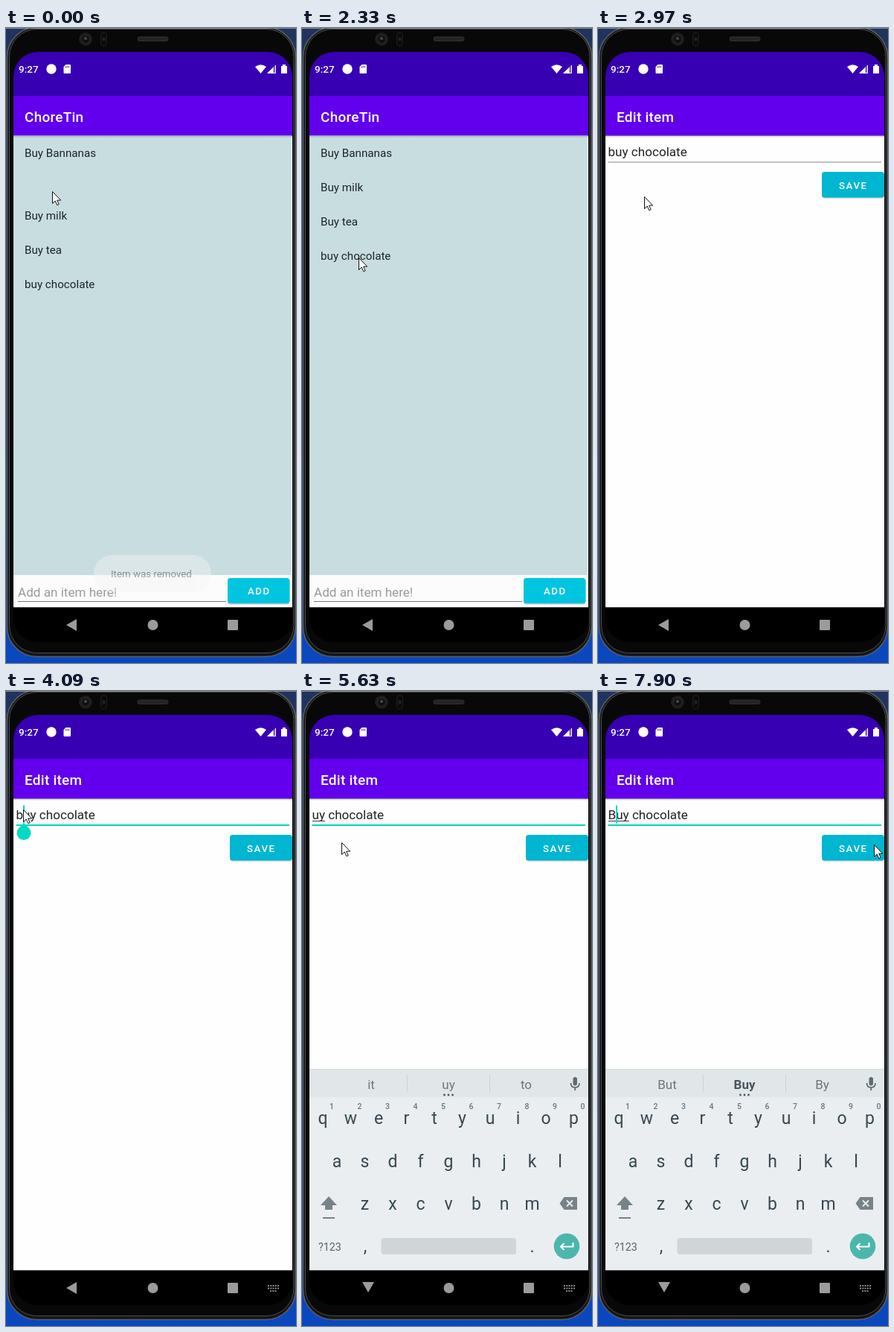
Write an HTML page that moves like this. It is 390 px wide and 852 px high and loops after 8000 ms.

```html
<!DOCTYPE html>
<html lang="en">
<head>
<meta charset="utf-8">
<title>To-do app demo</title>
<style>
  html, body { margin: 0; width: 100%; height: 100%; overflow: hidden; background: #000; }
  svg { display: block; width: 390px; height: 852px; }
  text { font-family: Roboto, "Noto Sans", sans-serif; white-space: pre; }
  .title { font-size: 19px; font-weight: 500; letter-spacing: .24px; fill: #fff; }
  .item { font-size: 15.2px; fill: #1f2426; }
  .field { font-size: 17.1px; fill: #222; }
  .button { font-size: 13.3px; font-weight: 500; letter-spacing: 1.5px; fill: #fff; }
  .key { font-size: 23px; fill: #37474f; text-anchor: middle; }
  .digit { font-size: 10.5px; font-weight: 500; fill: #6b767c; text-anchor: middle; }
  .hint { font-size: 17px; fill: #6d767b; text-anchor: middle; }
  .bold { font-weight: 700; fill: #4a555b; }
</style>
</head>
<body>
<svg viewBox="0 0 390 852">
  <defs>
    <clipPath id="screen"><rect x="10" y="32" width="375" height="792" rx="33"/></clipPath>
    <clipPath id="aboveNav"><rect x="10" y="32" width="375" height="745"/></clipPath>
    <linearGradient id="desk" x2="0" y2="1">
      <stop offset="0" stop-color="#20345f"/><stop offset=".5" stop-color="#12306f"/>
      <stop offset="1" stop-color="#0a48c0"/>
    </linearGradient>
    <linearGradient id="shade" x2="0" y2="1">
      <stop offset="0" stop-color="#000" stop-opacity=".2"/><stop offset="1" stop-color="#000" stop-opacity="0"/>
    </linearGradient>
  </defs>

  <rect width="390" height="852" fill="url(#desk)"/>
  <g id="phone">
    <rect x="1.5" y="-1" width="388" height="844.5" rx="40" fill="#161616" stroke="#5d6063" stroke-width="1.5"/>
    <rect x="4.5" y="1.5" width="382.5" height="837" rx="37" fill="#080808" stroke="#4a4c4e"/>
    <path d="M0 .5H390" stroke="#8b8b8b"/>
    <circle cx="107" cy="15" r="9" fill="#1d1d1e"/>
    <circle cx="107" cy="15" r="5.5" fill="#101013" stroke="#2c2c2e"/>
    <circle cx="107" cy="14" r="2" fill="#48484c"/>
    <rect x="127.500" y="5.500" width="8" height="19" rx="4" fill="#0b0b0b" stroke="#202020"/>
    <circle cx="131.500" cy="15" r="2.500" fill="#202022"/>
    <rect x="177" y="12" width="41" height="5.500" rx="2.500" fill="#242424" stroke="#303030"/>
  </g>

  <g clip-path="url(#screen)">
    <rect x="10" y="32" width="375" height="792"/>
    <g id="listPage">
      <rect x="10" y="32" width="375" height="60" fill="#3700b3"/>
      <rect x="10" y="91" width="375" height="53.500" fill="#6200ee"/>
      <text class="title" x="25" y="125.700">ChoreTin</text>
      <rect x="10" y="144.500" width="375" height="590" fill="#fcfcfc"/>
      <rect x="10" y="144.500" width="374" height="589.500" fill="#c8dde0"/>
      <rect x="10" y="144.500" width="375" height="3" fill="url(#shade)"/>
      <text class="item" x="25" y="173.300">Buy Bannanas</text>
      <g id="rest">
        <text class="item" x="25" y="219.200">Buy milk</text>
        <text class="item" x="25" y="265">Buy tea</text>
        <text class="item" x="25" y="310.900">buy chocolate</text>
      </g>
      <rect x="10" y="734" width="375" height="43.500" fill="#fcfcfc"/>
      <text class="field" x="16" y="762.500" style="fill:#9a9a9a">Add an item here!</text>
      <path d="M16 769.500H296" stroke="#777"/>
      <rect x="298" y="739.500" width="83.500" height="34" rx="4" fill="#000" opacity=".22"/>
      <rect x="298" y="738" width="83.500" height="34" rx="4" fill="#00c5e0"/>
      <text class="button" x="325" y="760.200">ADD</text>
      <rect x="10" y="777.500" width="375" height="60"/>
    </g>
    <rect id="dim" x="10" y="32" width="375" height="792" opacity=".08"/>
    <g id="toast">
      <rect x="118" y="707" width="158" height="50" rx="25" fill="#f4f4f4"/>
      <text x="141" y="737" font-size="13.300" fill="#222">Item was removed</text>
    </g>

    <g id="editPage">
      <rect x="10" y="32" width="375" height="60" fill="#3700b3"/>
      <rect x="10" y="91" width="375" height="53.500" fill="#6200ee"/>
      <text class="title" x="25" y="125.700">Edit item</text>
      <rect x="10" y="144.500" width="375" height="633" fill="#fefefe"/>
      <rect x="10" y="144.500" width="375" height="3" fill="url(#shade)"/>
      <text id="entry" class="field" x="13.500" y="172.300"></text>
      <path id="composing" stroke="#333"/>
      <path id="fieldLine"/>
      <rect x="301" y="194.500" width="84" height="34" rx="4" fill="#000" opacity=".22"/>
      <rect x="301" y="193" width="84" height="34.500" rx="4" fill="#00b6d0"/>
      <text class="button" x="324" y="215.700">SAVE</text>
      <rect x="10" y="777.500" width="375" height="60"/>
    </g>
    <rect id="caret" y="153.500" width="2" height="24" fill="#03dac5"/>
    <path id="handle" d="M24 177.500L31 184A9.500 9.500 0 1 1 17 184Z" fill="#03dac5"/>
    <g clip-path="url(#aboveNav)"><g id="keyboard"></g></g>

    <g id="status" fill="#fff">
      <text x="17" y="60.200" font-size="13.500" font-weight="500">9:27</text>
      <circle cx="61" cy="55" r="6.700"/>
      <path d="M80.500 49H86Q87 49 87 50V60Q87 61 86 61H78.500Q77.500 61 77.500 60V52Z"/>
      <path d="M80.500 51V53.500M82.500 51V53.500M84.500 51V53.500" stroke="#3700b3" stroke-width=".8"/>
      <path d="M335 52Q342.500 46.500 350 52L342.500 61Z"/>
      <path d="M351 61L363 49V61Z" fill-opacity=".35"/>
      <path d="M351 61L359.500 52.500V61Z"/>
      <path d="M352.500 60.500H362.500V50" fill="none" stroke="#fff"/>
      <path d="M370 51H372V49H376V51H378V61H370Z"/>
    </g>
    <g id="nav" fill="#9b9b9b">
      <path id="back"/>
      <circle cx="197.500" cy="801" r="7"/>
      <rect x="298" y="794" width="14" height="14" rx="1"/>
      <path id="imeIcon" d="M352 798H367M352 801.500H367M355 805H364" fill="none" stroke="#8c8c8c" stroke-width="2" stroke-dasharray="2 1.250"/>
    </g>
  </g>
  <path id="pointer" d="M.5 .5V16.500L4.200 13L6.800 18.700L9.200 17.600L6.700 12.100H11.700Z" fill="#fff" stroke="#111"/>
</svg>

<script>
const $ = id => document.getElementById(id);
const LOOP = 8000, CENTER = [197.5, 428];

function label(cls, x, y, str) {
  return `<text class="${cls}" x="${x}" y="${y}">${str}</text>`;
}

function buildKeyboard() {
  const row = (letters, x, y) =>
    [...letters].map((ch, i) => label("key", x + 37.5 * i, y, ch)).join("");
  const digits = [..."1234567890"].map((d, i) => label("digit", 40 + 37.5 * i, 561, d)).join("");
  const dots = [191.5, 197, 202.5].map(x => `<circle cx="${x}" cy="542" r="1.4" fill="#455a64"/>`).join("");
  $("keyboard").innerHTML = `
    <rect x="10" y="507" width="375" height="271" fill="#eaeef1"/>
    <rect x="10" y="507" width="375" height="38" fill="#e1e6e9"/>
    <path d="M10 507.500H385" stroke="#d5dadd"/>
    <path d="M141.500 515V538M252.500 515V538" stroke="#ccd2d5"/>
    ${[93, 197, 301.5].map(x => label("hint", x, 533.5, "")).join("")}${dots}
    <rect x="364.500" y="518" width="5.500" height="11.500" rx="2.750" fill="#5f6b71"/>
    <path d="M361.500 526Q361.500 532 367.250 532T373 526M367.250 532V536" fill="none" stroke="#5f6b71" stroke-width="1.700"/>
    ${row("qwertyuiop", 28, 581)}${digits}${row("asdfghjkl", 47, 638.5)}${row("zxcvbnm", 84.5, 696)}
    <path d="M36 678L47 690H41V696H31V690H25Z" fill="#788389"/>
    <rect x="28" y="706" width="16" height="2" fill="#788389"/>
    <path d="M352.500 679H370V696H352.500L346.500 687.500Z" fill="#788389"/>
    <path d="M356 683.500L364 691.500M364 683.500L356 691.500" stroke="#eaeef1" stroke-width="1.800"/>
    <text x="22" y="750.500" font-size="14.300" fill="#56636a">?123</text>
    ${label("key", 85, 753, ",")}${label("key", 309.5, 753, ".")}
    <rect x="106.500" y="734" width="181.500" height="22" rx="4" fill="#d0d5d8"/>
    <circle cx="356" cy="745" r="17.300" fill="#4db6ac"/>
    <path d="M364.500 740V745.500H348.500M352.500 741L348 745.500L352.500 750" fill="none" stroke="#fff" stroke-width="2"/>`;
}
buildKeyboard();
const hints = document.querySelectorAll(".hint");

// Each step changes part of the state and holds until the next.
const steps = [
  [0, { pointer: [62, 219], gap: 38, toast: .42, list: 1, edit: 0, entry: "buy chocolate", underline: 0,
        focus: false, caret: 0, handle: false, ime: false, keys: 0, words: ["but", "buy", "by"] }],
  [120, { gap: 19, toast: .16 }],
  [240, { gap: 5, toast: 0 }],
  [360, { gap: 0 }],
  [640, { pointer: [78, 349] }],
  [790, { pointer: [77, 346] }],
  [920, { pointer: [76, 343] }],
  [1070, { pointer: [76, 310] }],
  [2330, { pointer: [76, 308] }],
  [2450, { pointer: [76, 305], list: 1.038, edit: .9668 }],
  [2570, { list: 1.05, edit: .993 }],
  [2690, { edit: 1 }],
  [2970, { pointer: [62, 226] }],
  [3090, { pointer: [46, 169] }],
  [3240, { pointer: [23, 159] }],
  [3670, { focus: true, caret: 23 }],
  [3970, { handle: true, ime: true }],
  [4210, { pointer: [28, 163], keys: .5 }],
  [4360, { pointer: [47, 199], keys: 1, underline: 41 }],
  [4480, { pointer: [53, 203] }],
  [4630, { caret: 0 }],
  [5110, { caret: 13.5, entry: "uy chocolate", underline: 31, words: ["it", "uy", "to"] }],
  [5260, { handle: false }],
  [5630, { caret: 0 }],
  [6190, { caret: 13.5 }],
  [6620, { caret: 24, entry: "Buy chocolate", underline: 42 }],
  [6740, { words: ["But", "Buy", "By"] }],
  [7170, { caret: 0 }],
  [7630, { caret: 24 }],
  [7750, { pointer: [343, 203] }],
  [7900, { pointer: [371, 206] }],
];

function stateAt(t) {
  return Object.assign({}, ...steps.filter(([at]) => at <= t).map(([, change]) => change));
}

function set(id, attrs) {
  for (const name in attrs) $(id).setAttribute(name, attrs[name]);
}

function show(id, visible) {
  $(id).style.display = visible ? "" : "none";
}

function zoom(s) {
  const [x, y] = CENTER;
  return s === 1 ? "" : `translate(${x} ${y}) scale(${s}) translate(${-x} ${-y})`;
}

function draw(t) {
  const s = stateAt(t);
  set("pointer", { transform: `translate(${s.pointer})` });
  set("rest", { transform: `translate(0 ${s.gap})` });
  set("toast", { opacity: s.toast });
  set("listPage", { transform: zoom(s.list) });
  set("editPage", { transform: zoom(s.edit) });
  show("listPage", s.edit < 1);
  show("editPage", s.edit > 0);
  show("dim", s.edit > 0 && s.edit < 1);

  $("entry").textContent = s.entry;
  set("composing", { d: s.underline ? `M14 174.500H${s.underline}` : "" });
  set("fieldLine", { d: "M13.500 180H381", stroke: s.focus ? "#03d5c1" : "#858585", "stroke-width": s.focus ? 2 : 1 });
  set("caret", { x: s.caret });
  show("caret", s.caret > 0);
  show("handle", s.handle);

  show("keyboard", s.keys > 0);
  set("keyboard", { transform: `translate(0 ${(1 - s.keys) * 180})`, opacity: s.keys });
  hints.forEach((hint, i) => {
    hint.textContent = s.words[i];
    hint.classList.toggle("bold", i === 1 && s.words[1] !== "uy");
  });
  show("imeIcon", s.ime);
  set("back", { d: s.keys ? "M81 793H97L89 807Z" : "M81 801L95 793V809Z" });
}

const start = performance.now();
function tick() {
  draw((performance.now() - start) % LOOP);
  requestAnimationFrame(tick);
}
tick();
</script>
</body>
</html>
```
